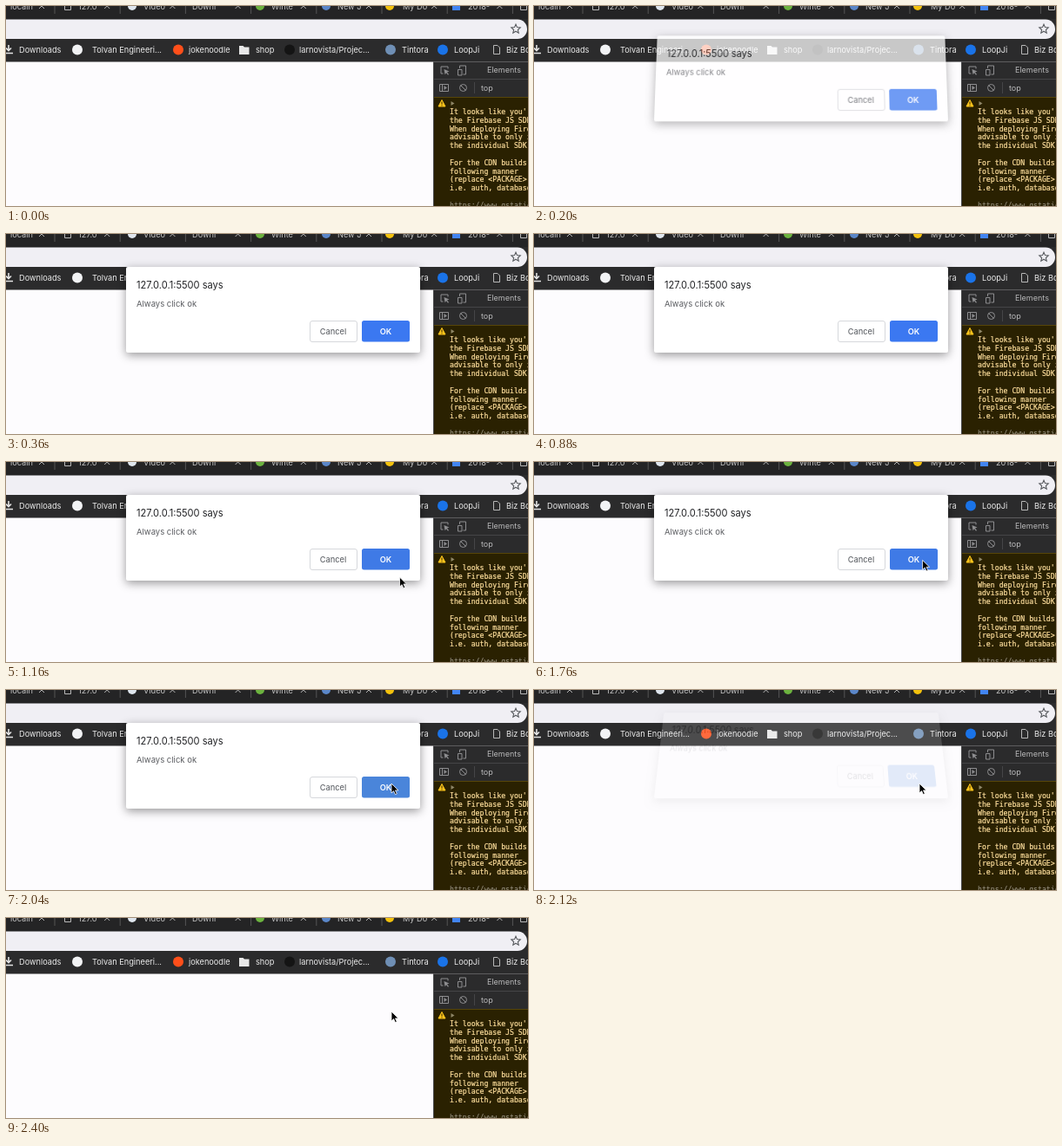
Animation of 600 by 231 pixels, one loop 2.52 s. Source, as an HTML page:

```html
<!DOCTYPE html>
<html lang="en">
<head>
<meta charset="utf-8">
<title>Confirm dialog</title>
<style>
  html, body { margin: 0; width: 100%; height: 100%; overflow: hidden; background: #fdfcfe; }
  svg { position: absolute; left: 0; top: 0; font: 9.2px Inter, sans-serif; }
  #dialog {
    left: 138px; top: 38px; background: #fff; border-radius: 2px;
    box-shadow: 0 3px 11px rgba(0, 0, 0, .4); transform-origin: 50% 100%;
  }
  #console {
    font: 8.2px "DejaVu Sans Mono", monospace; white-space: pre;
    fill: #ffdf9e; stroke: #ffdf9e; stroke-width: .2;
  }
  #console :last-child { fill: #a09a8c; stroke: none; }
  .line { fill: none; stroke: #b8b8b8; }
  .tools { fill: none; stroke: #8e8e90; }
  .solid { fill: #8e8e90; stroke: none; }
  .button { text-anchor: middle; }
</style>
</head>
<body>
<svg width="600" height="231">
  <rect width="600" height="64.5" fill="#2b2b2c"/>
  <rect width="600" height="15" fill="#242425"/>
  <g id="tabs" fill="#c4c4c4"></g>
  <rect x="-20" y="15.5" width="619" height="22.5" rx="11" fill="#f0eff4"/>
  <path d="M586 21.2l1.5 3.4 3.7.4-2.8 2.5.8 3.6-3.2-1.9-3.2 1.9.8-3.6-2.8-2.5 3.7-.4z"
        fill="none" stroke="#55585c" stroke-width="1.1"/>
  <g id="bookmarks" fill="#ececec"></g>
  <path d="M3 45v6M0 48.5l3 3 3-3M-2 54.5h10" fill="none" stroke="#e4e4e4" stroke-width="1.6"/>
  <path d="M268 46h4.5l1.5 1.5h5.5v8.5h-11.5z" fill="#e8e8e8"/>
  <path d="M560.5 45.5h4.5l2.5 2.5v7.5h-7z" class="line"/>

  <rect x="491" y="64.5" width="109" height="167" fill="#2b2b2c"/>
  <path d="M491.5 65v166M491 84.5h109M538.5 88v13" fill="none" stroke="#454547"/>
  <g class="tools">
    <path d="M508 72.5v-2.5h-8v8h2.5"/>
    <path d="M503.5 73l6 2.5-2.5 1 2 2.5-1 .8-2-2.6-1.5 2z" class="solid"/>
    <path d="M521.5 72v-3h7v10h-3M519.5 73.5h4.5v6.5h-4.5z"/>
    <path d="M498.5 90.5h10v8h-10zM501.5 90.5v8"/>
    <path d="M503.5 92v5l3.5-2.5z" class="solid"/>
    <circle cx="525.5" cy="94.5" r="4"/>
    <path d="M522.7 91.7l5.6 5.6"/>
  </g>
  <g fill="#b9b9ba" font-size="9">
    <text x="553" y="77">Elements</text>
    <text x="546" y="97.5">top</text>
  </g>
  <rect x="492" y="105" width="108" height="126" fill="#2a2101"/>
  <path d="M492 105.5h108" stroke="#574609"/>
  <path d="M501 108.5l4 7.5h-8z" fill="#fdc51c" stroke="#fdc51c" stroke-linejoin="round"/>
  <path d="M501 110.5v3M501 114.5v1" stroke="#2a2101"/>
  <path d="M511.5 110v5l4-2.5z" fill="#8f8768"/>
  <g id="console"></g>
</svg>

<svg id="dialog" width="338" height="98.5">
  <text x="12" y="24.8" font-size="11.1" fill="#202124">127.0.0.1:5500 says</text>
  <text x="12" y="46.3" font-size="9.5" fill="#5a5c60">Always click ok</text>
  <rect x="211.5" y="62.5" width="54" height="24" rx="2.5" fill="#fff" stroke="#d6d8dc"/>
  <text x="238" y="77.7" class="button" font-weight="500" fill="#66696e">Cancel</text>
  <rect id="ok" x="271" y="62" width="55" height="24.6" rx="2.5"/>
  <text x="298.5" y="77.7" class="button" font-weight="600" fill="#fff">OK</text>
</svg>

<svg width="600" height="231">
  <path id="cursor" d="M0 0v11l2.6-2.4 1.8 4 1.9-.8-1.8-3.9h3.5z" stroke="#fff" stroke-width=".8"/>
</svg>

<script>
const $ = id => document.getElementById(id);
const clamp = v => Math.min(1, Math.max(0, v));
const smooth = v => (v = clamp(v), v * v * (3 - 2 * v));
const label = (x, y, text) => `<text x="${x}" y="${y}">${text}</text>`;
const dot = (x, y, r, color) => `<circle cx="${x}" cy="${y}" r="${r}" fill="${color}"/>`;

const page = x => `<path class="line" d="M${x} -4v8.5h7v-8.5"/>`;
const tabs = [
  [5, 'localh'], [83, '127.0', page(67.5)], [158, 'Video', dot(145, 0, 5, '#dfe6ee')],
  [214, 'Downl'], [305, 'Winte', dot(292, 0, 5, '#6cb33f')], [381, 'New J', dot(368, 0, 5, '#5b87c9')],
  [456, 'My Do', dot(441, 0, 5, '#f4c20d')],
  [531, '2018-', '<rect x="513" y="-5" width="9" height="10" fill="#4285f4"/>']
];
$('tabs').innerHTML = tabs.map(([x, text, icon = ''], i) => {
  const close = 41 + 75.2 * i;
  return icon + label(x, 3.5, text) +
    `<path class="line" d="M${close - 3} -3l6 6m0-6l-6 6"/>` +
    `<path class="line" style="stroke:#555" d="M${close + 15} 0v9"/>`;
}).join('') + page(591.5);

const bookmarks = [
  [15, 'Downloads'], [99, 'Tolvan Engineeri...', '#f2f3f5', 82], [210, 'jokenoodle', '#ff4f1a', 198],
  [287, 'shop'], [337, 'larnovista/Projec...', '#141414', 326], [455, 'Tintora', '#6f8fb5', 442],
  [515, 'LoopJi', '#1a73e8', 502], [575, 'Biz Bo']
];
$('bookmarks').innerHTML = bookmarks.map(([x, text, color, cx]) =>
  (color ? dot(cx, 50.5, 6, color) : '') + label(x, 53.8, text)).join('');

const message = `It looks like you're
the Firebase JS SDK
When deploying Fire
advisable to only i
the individual SDK

For the CDN builds,
following manner
(replace &lt;PACKAGE&gt; w
i.e. auth, database

https://www.gstatic`.split('\n');
$('console').innerHTML = message.map((text, i) => label(510, 125 + 9.8 * i, text)).join('');

// The dialog folds back around its lower edge while it fades.
function poseDialog(shown) {
  const away = 1 - shown, tilt = .085 * away;
  $('dialog').style.opacity = shown;
  $('dialog').style.transform = `translateY(${-14 * away}px) ` +
    `matrix3d(1,0,0,0, 0,${1 + tilt},0,${-tilt / 98.5}, 0,0,1,0, 0,0,0,1)`;
}

function draw() {
  const t = Math.floor(performance.now() % 2520 / 40) * 40;
  poseDialog(t < 1000 ? clamp((t - 82) / 160) : clamp((2134 - t) / 90));
  $('ok').setAttribute('fill', t < 1160 ? '#3b78f1' : t < 1960 ? '#3f7ae6' : '#4a85da');

  const enter = 1 - smooth((t - 920) / 320), drift = smooth((t - 1720) / 200);
  const x = 447 + 35 * enter - 4 * drift, y = 114 + 122 * enter - 6 * drift;
  $('cursor').setAttribute('transform', `translate(${x} ${y})`);
  requestAnimationFrame(draw);
}
draw();
</script>
</body>
</html>
```
